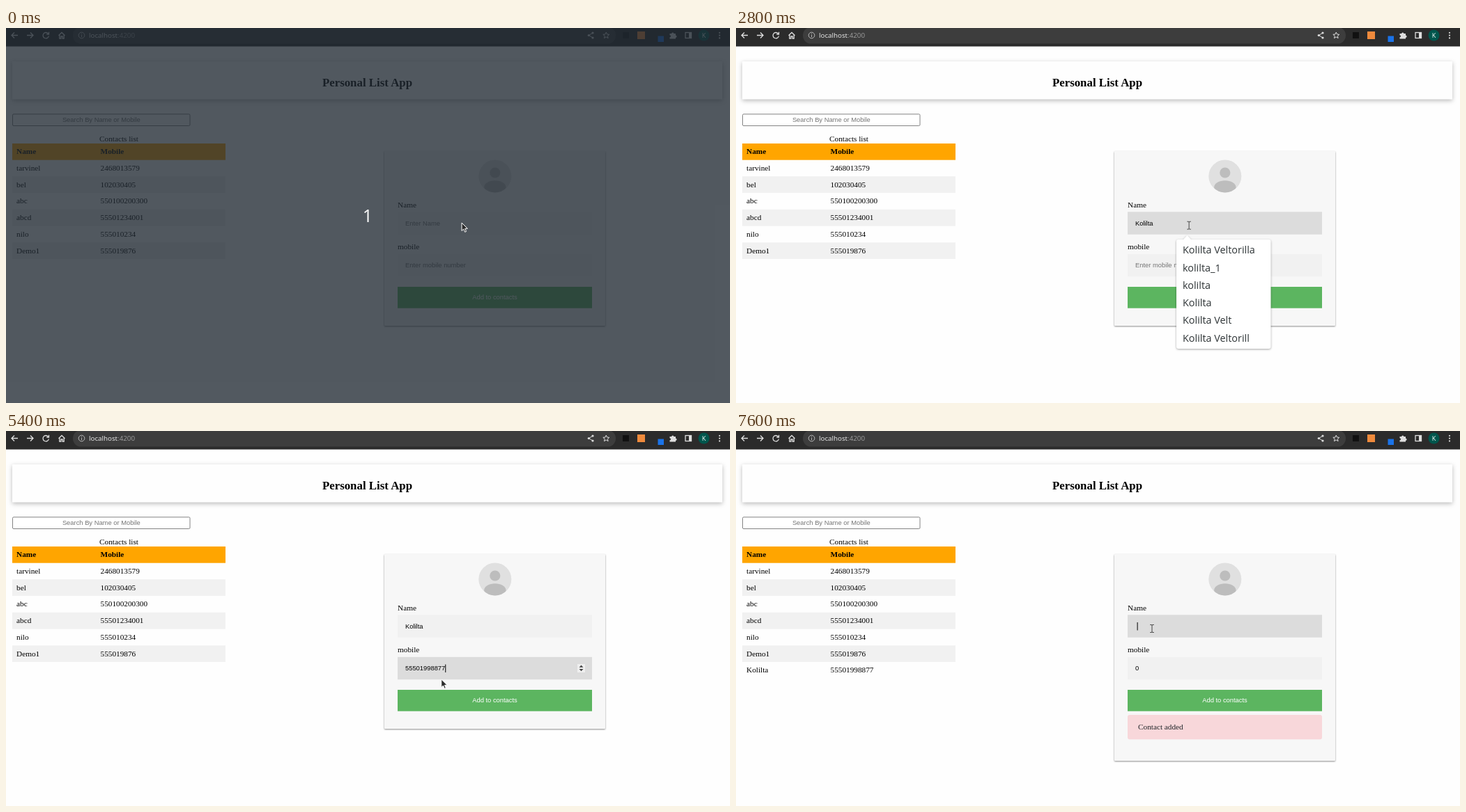
An HTML page for the animation above (8000 ms loop, 1039 px wide and 539 px high).

```html
<!DOCTYPE html>
<html lang="en">
<head>
<meta charset="utf-8">
<title>Contacts</title>
<style>
html, body { margin: 0; width: 100%; height: 100%; overflow: hidden; background: #fefefe; }
svg { display: block; }
text { font: 11.27px "Liberation Serif", serif; white-space: pre; }
.b { font-weight: bold; }
.sans { font: 9.37px "Liberation Sans", sans-serif; }
.hint { fill: #757575; }
.ui { font: 14.4px "Open Sans", sans-serif; fill: #2e3436; }
.icon { fill: none; stroke: #dedede; stroke-width: 1.3; }
.pop { filter: drop-shadow(0 1px 1.5px rgba(0,0,0,.35)); fill: #fff; }
.cursor { fill: #2a2a2a; stroke: #fff; stroke-width: 1; stroke-linejoin: round; }
#ibeam { fill: none; stroke: #333; filter: drop-shadow(0 0 .6px #fff); }
</style>
</head>
<body>
<svg width="1039" height="539" viewBox="0 0 1039 539">
  <rect width="1039" height="539" fill="#fefefe"/>

  <!-- browser bar -->
  <rect width="1039" height="26.5" fill="#2b2b2b"/>
  <rect x="96" y="-1" width="779" height="23.5" rx="11.5" fill="#3d3d3d"/>
  <g class="icon">
    <path d="M17 10.5H8M12 6.5L8 10.5L12 14.5M30 10.5H39M35 6.5L39 10.5L35 14.5"/>
    <path d="M60.5 8A4.2 4.2 0 1 0 61.4 11.5M61.5 5.8V9H58.3"/>
    <path d="M75.5 10.8L80 6.5L84.5 10.8M76.8 10V15H78.9V12H81.1V15H83.2V10"/>
    <g stroke="#bbb" stroke-width="1"><circle cx="108.5" cy="10.5" r="4.3"/><path d="M108.5 10V13M108.5 8V9"/></g>
    <path d="M842 7L836.5 10.5L842 14" stroke-width="1"/>
    <path d="M861.3 6l1.3 3 3.2.3-2.4 2.1.7 3.2-2.8-1.7-2.8 1.7.7-3.2-2.4-2.1 3.2-.3z" stroke-width="1"/>
    <rect x="975" y="6.5" width="8.5" height="8"/>
  </g>
  <g fill="#dedede">
    <circle cx="842" cy="7" r="1.6"/><circle cx="836.3" cy="10.5" r="1.6"/><circle cx="842" cy="14" r="1.6"/>
    <path d="M952.5 8h2.7a1.6 1.6 0 0 1 3.2 0h2.6v2.6a1.6 1.6 0 0 1 0 3.2V15.5h-8.5v-2.2a1.5 1.5 0 0 0 0-3z"/>
    <rect x="980" y="6.5" width="3.5" height="8"/>
    <circle cx="1024" cy="6.8" r="1.1"/><circle cx="1024" cy="10.6" r="1.1"/><circle cx="1024" cy="14.4" r="1.1"/>
  </g>
  <rect x="885" y="6" width="9" height="9" fill="#111"/>
  <rect x="906" y="5" width="11" height="11" fill="#ef8a3c"/>
  <rect x="935.5" y="11.5" width="8.5" height="8.5" fill="#1a73e8"/>
  <circle cx="1001.5" cy="10.5" r="8" fill="#00564d"/>
  <text class="ui" x="1001.5" y="13.8" text-anchor="middle" style="font-size:9px;fill:#fff">K</text>
  <text class="ui" x="119" y="14.2" style="font-size:9.8px;fill:#f0f0f0">localhost<tspan fill="#a0a0a0">:4200</tspan></text>

  <!-- page heading and table -->
  <rect x="9" y="48" width="1019" height="54.5" fill="#fefefe" style="filter:drop-shadow(0 2.5px 3px rgba(0,0,0,.27))"/>
  <text class="b" x="518.5" y="84" text-anchor="middle" style="font-size:16.85px">Personal List App</text>
  <rect x="9.5" y="123.8" width="254.5" height="16.7" rx="1.5" fill="#fff" stroke="#767676" stroke-width=".9"/>
  <text class="sans hint" x="136.8" y="135.3" text-anchor="middle">Search By Name or Mobile</text>
  <text x="162" y="163" text-anchor="middle">Contacts list</text>
  <rect x="9" y="166" width="306" height="23.7" fill="#ffa500"/>
  <g id="table"></g>

  <!-- form -->
  <rect id="card" x="543" y="177" width="317" height="251" rx="1" fill="#f7f7f7" style="filter:drop-shadow(0 1.2px 1.2px rgba(0,0,0,.45))"/>
  <clipPath id="round"><circle cx="701.8" cy="213" r="23.5"/></clipPath>
  <g clip-path="url(#round)">
    <rect x="678" y="189" width="48" height="48" fill="#e0e0e0"/>
    <g fill="#bdbdbd"><circle cx="701.8" cy="208" r="7.6"/><ellipse cx="701.8" cy="229" rx="15.7" ry="9.8"/></g>
  </g>
  <text x="562" y="258">Name</text>
  <text x="562" y="318">mobile</text>
  <rect id="nameBox" x="562" y="264.3" width="279" height="32.4"/>
  <rect id="mobileBox" x="562" y="324.8" width="279" height="32.4"/>
  <text id="nameText" class="sans" x="573" y="283.8"></text>
  <text id="mobileText" class="sans" x="573" y="344.2"></text>
  <g id="spinner">
    <rect x="820" y="335" width="11" height="12" fill="#efefef"/>
    <path d="M822.5 339.8L825.5 336.6L828.5 339.8zM822.5 342L825.5 345.2L828.5 342z" fill="#444"/>
  </g>
  <rect id="caret" width="1" height="11.5"/>
  <rect id="button" x="562" y="372" width="279" height="30.7" fill="#4caf50"/>
  <text class="sans" x="701.5" y="390.2" text-anchor="middle" fill="#fff">Add to contacts</text>
  <g id="notice">
    <rect x="562" y="408" width="279" height="35.3" rx="3" fill="#f8d7da"/>
    <text x="577" y="429" fill="#212529">Contact added</text>
  </g>

  <!-- autofill popups -->
  <g id="names">
    <path class="pop" d="M635 304H642L647.5 298L653 304H764.5Q767.5 304 767.5 307V458Q767.5 461 764.5 461H635Q632 461 632 458V307Q632 304 635 304Z"/>
    <g id="options"></g>
  </g>
  <g id="numbers">
    <path class="pop" d="M635 364H642L647.5 358L653 364H731Q734 364 734 367V392Q734 395 731 395H635Q632 395 632 392V367Q632 364 635 364Z"/>
    <text class="ui" x="641" y="384.3" style="font:15px Lato,sans-serif">******4829</text>
  </g>

  <g id="countdown">
    <rect width="1039" height="539" fill="rgb(33,42,51)" fill-opacity=".78"/>
    <text class="ui" x="519" y="279" text-anchor="middle" style="font-size:25px;fill:#fff">1</text>
  </g>

  <g id="mouse">
    <path id="arrow" class="cursor" d="M0 0V11.5L2.7 9L4.6 13.3L6.5 12.4L4.7 8.3H8.3Z"/>
    <path id="ibeam" d="M-2.7-5.5H-.8L0-4.8L.8-5.5H2.7M-2.7 5.5H-.8L0 4.8L.8 5.5H2.7M0-5V5"/>
    <path id="hand" class="cursor" d="M-1.6-.6Q-.3-1.7.7 0L2.2 3.2L5 3.4Q7.4 4 7.2 7V11.5H.6L-4.8 7.8Q-5.4 6 -3.4 5.9L.2 6.2Z"/>
  </g>
</svg>
<script>
const $ = id => document.getElementById(id);
const show = (id, on) => $(id).style.display = on ? '' : 'none';
const svgText = (x, y, s, cls = '') => `<text class="${cls}" x="${x}" y="${y}">${s}</text>`;

const LOOP = 8000, PERSON = 'Kolilta', NUMBER = '55501998877', SUBMIT = 5800;
const contacts = [
  ['tarvinel', '2468013579'], ['bel', '102030405'], ['abc', '550100200300'],
  ['abcd', '55501234001'], ['nilo', '555010234'], ['Demo1', '555019876'], [PERSON, NUMBER]
];
const saved = ['Kolilta Veltorilla', 'Demo1', 'Kolilt', 'nilo', 'kolilta_1', 'abcd', 'Koli',
  'kolilta', 'Kolilta', 'Kolilta Velt', 'Kolilta Veltorill'];

// Time of each keystroke
const nameKeys = [1200, 1500, 1600, 1700, 1800, 1900, 2400];
const numberKeys = [4300, 4300, 4400, 4500, 4500, 4600, 4600, 4700, 4800, 4900, 5100];
const typed = (word, keys, t) => word.slice(0, keys.filter(k => k <= t).length);

// Pointer moves: start, end, from, to
const moves = [
  [2700, 3300, [654, 280], [601.5, 330]],
  [5100, 5700, [601.5, 330], [648, 384]],
  [6900, 7500, [648, 384], [597, 284]]
];
function pointer(t) {
  const [start, end, from, to] = moves.findLast(m => t >= m[0]) || moves[0];
  const p = Math.min(1, Math.max(0, (t - start) / (end - start)));
  const e = p * p * (3 - 2 * p);
  return from.map((v, i) => v + (to[i] - v) * e);
}

function drawTable(done) {
  const rows = [['Name', 'Mobile'], ...contacts.slice(0, done ? 7 : 6)];
  $('table').innerHTML = rows.map(([name, mobile], i) => {
    const y = 181 + 23.75 * i, cls = i ? '' : 'b';
    const band = i && i % 2 === 0 ? `<rect x="9" y="${y - 15.2}" width="306" height="23.75" fill="#f1f1f1"/>` : '';
    return band + svgText(15, y, name, cls) + svgText(135.5, y, mobile, cls);
  }).join('');
}

function setField(id, value, hint, focused) {
  const text = $(id + 'Text');
  text.textContent = value || hint;
  text.classList.toggle('hint', !value);
  $(id + 'Box').setAttribute('fill', focused ? '#dcdcdc' : '#f1f1f1');
  if (focused) {
    $('caret').setAttribute('x', 573 + (value ? text.getComputedTextLength() : 0));
    $('caret').setAttribute('y', id === 'name' ? 275 : 335.5);
  }
}

function draw(t) {
  const done = t >= SUBMIT;
  const onName = t >= 500 && t < 3600 || t >= 7600;
  const onMobile = t >= 3600 && !done;
  const name = done ? ' ' : typed(PERSON, nameKeys, t);
  const blink = [[1000, 1200], [2800, 3300], [4100, 4300]].some(([a, b]) => t >= a && t < b);

  drawTable(done);
  setField('name', name, 'Enter Name', onName);
  setField('mobile', done ? '0' : typed(NUMBER, numberKeys, t), 'Enter mobile number', onMobile);
  show('caret', (onName || onMobile) && !blink);
  $('card').setAttribute('height', done ? 297 : 251);
  show('notice', done);

  const fading = t === 3600;
  show('names', t >= 500 && t <= 3600);
  $('names').setAttribute('opacity', fading ? .67 : 1);
  $('names').setAttribute('transform', fading ? 'translate(700 383) scale(.985) translate(-700 -383)' : '');
  $('options').innerHTML = saved
    .filter(s => s.toLowerCase().startsWith(name.toLowerCase())).slice(0, 6)
    .map((s, i) => svgText(641, 324.2 + 25.3 * i, s, 'ui')).join('');
  show('numbers', t >= 3600 && t < 4300);

  const [x, y] = pointer(t);
  const overMobile = y > 325 && y < 357, overButton = y > 372;
  const overInput = overMobile || y < 297;
  const shape = t < 100 ? 'arrow' : overInput ? 'ibeam' : overButton ? 'hand' : 'arrow';
  for (const id of ['arrow', 'ibeam', 'hand']) show(id, id === shape);
  $('mouse').setAttribute('transform', `translate(${x} ${y})`);
  show('spinner', onMobile || overMobile);
  $('button').setAttribute('opacity', overButton ? 1 : .9);
  show('countdown', t < 100);
}

let last = -1;
const begin = performance.now();
function tick() {
  const t = Math.floor((performance.now() - begin) % LOOP / 100) * 100;
  if (t !== last) draw(last = t);
  requestAnimationFrame(tick);
}
tick();
</script>
</body>
</html>
```
